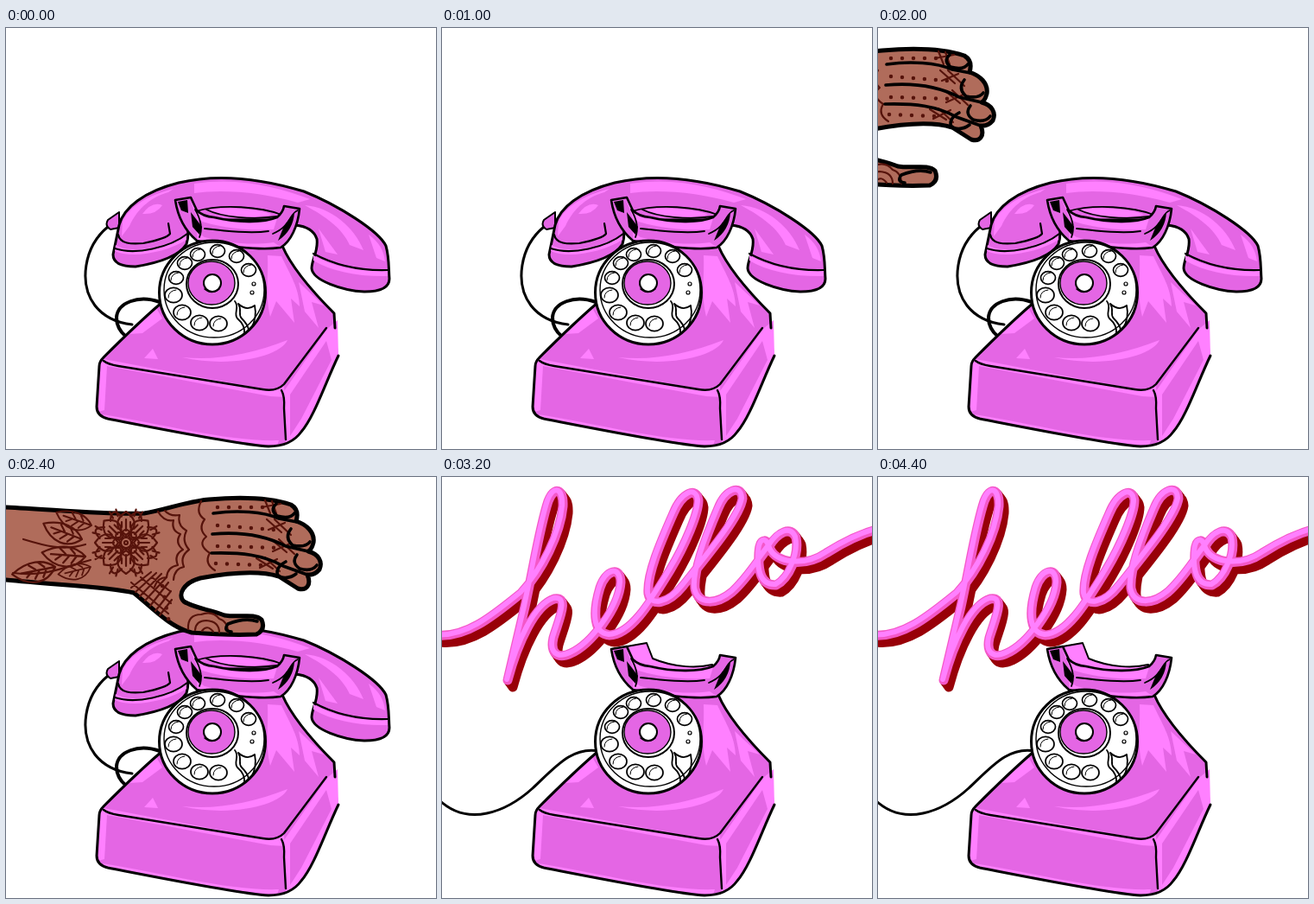
These frames come from a looping animation (498x487 px, 4.6 s). An HTML page:

```html
<!DOCTYPE html>
<html lang="en">
<head>
<meta charset="utf-8">
<title>Hello phone</title>
<style>
html, body { margin: 0; width: 100%; height: 100%; overflow: hidden; background: #fff; }
svg { display: block; width: 100vw; height: 100vh; }
path, ellipse, circle { stroke-linecap: round; stroke-linejoin: round; }
.ink { fill: none; stroke: #000; stroke-width: 3; }
.thin { fill: none; stroke: #000; stroke-width: 1.8; }
.mid { fill: #e466e4; }
.lit { fill: #ff80ff; }
.white { fill: #fff; }
.skin { fill: #b06c5b; }
.henna { fill: none; stroke: #56130b; stroke-width: 2.2; }
.dots { stroke-width: 4.5; stroke-dasharray: 0 13; }
.tube { fill: none; }

#phone, #handset, #restCord, #liftCord, #looseCord, #hand, #hello, #sheen {
  animation: 4600ms step-end infinite;
}
#phone { transform-origin: 268px 355px; animation-name: ring; }
#handset { transform-origin: 280px 220px; animation-name: lift; }
#hand { transform-origin: 250px 110px; animation-name: reach; }
#restCord { animation-name: rest; }
#liftCord { animation-name: stretch; }
#looseCord, #hello { animation-name: after; }
#sheen { animation-name: flicker; }

@keyframes ring {
  0%, 6.52%, 13.04%, 17.39%, 21.73%, 32.6%, 39.13%, 100% { transform: none; }
  4.34%, 15.21%, 30.43% { transform: rotate(-3.1deg); }
  10.86%, 19.56%, 36.95% { transform: rotate(3.1deg); }
}
@keyframes reach {
  0% { visibility: hidden; transform: none; }
  43.47% { visibility: visible; transform: translate(-230px, 0); }
  47.82% { visibility: visible; transform: translate(-92px, 0); }
  52.17% { visibility: visible; transform: none; }
  56.52% { visibility: visible; transform: translate(-20px, 50px) rotate(17deg); }
  60.86% { visibility: visible; transform: translate(-70px, -40px) rotate(9deg); }
  65.21%, 100% { visibility: hidden; transform: none; }
}
@keyframes lift {
  0% { visibility: visible; transform: none; }
  60.86% { visibility: visible; transform: translate(-50px, -90px) rotate(-8deg); }
  65.21%, 100% { visibility: hidden; transform: none; }
}
@keyframes rest { 0% { visibility: visible; } 60.86%, 100% { visibility: hidden; } }
@keyframes stretch { 0%, 65.21%, 100% { visibility: hidden; } 60.86% { visibility: visible; } }
@keyframes after { 0% { visibility: hidden; } 65.21%, 100% { visibility: visible; } }
@keyframes flicker {
  0%, 69.56%, 78.26%, 86.95%, 95.65%, 100% { transform: none; }
  65.21%, 73.91%, 82.6%, 91.3% { transform: translate(2px, 2px); }
}
</style>
</head>
<body>
<svg viewBox="0 0 498 487" preserveAspectRatio="none">
  <defs>
    <path id="word" d="M-8 183C28 187 60 160 92 134C116 108 137 66 140 34C141 13 130 10 123 28C113 58 106 105 96 150L76 235C88 190 108 148 130 141C148 138 136 163 129 186C125 204 134 211 149 204C172 194 205 152 207 122C207 103 190 107 183 128C174 158 176 181 194 183C220 182 243 142 264 108C282 78 297 42 297 27C295 11 278 18 268 42C253 76 237 113 239 135C242 151 262 147 279 126C308 90 345 46 348 25C347 8 329 14 320 36C307 66 291 106 293 129C297 150 319 147 336 133C354 117 366 96 379 80C389 64 404 56 410 70C414 90 402 117 387 125C369 126 366 108 367 88C368 68 378 72 380 83C387 100 420 105 445 88C464 76 483 66 506 60"/>
    <path id="petal" d="M0-9C-13-17-13-27 0-36C13-27 13-17 0-9M0-14V-27M-5-18V-24M5-18V-24"/>
    <path id="leaf" d="M0 0C10-18 30-20 48-4C30 10 12 10 0 0L38-4M10-2L14-10M18-3L23-11M26-3L32-9M12 1L18 6M22-1L29 4"/>
    <path id="grip" d="M124 262L131 228C136 208 160 189 200 179C250 167 302 176 345 189C385 205 432 235 440 252C444 266 443 278 444 290C444 300 434 305 415 305C390 304 355 292 354 278C354 268 362 258 360 244C356 232 345 229 335 228L318 222L222 222L205 215C212 228 212 240 209 250C200 264 175 272 150 276C135 276 124 272 124 262Z"/>
  </defs>

  <g id="phone">
    <g class="ink">
      <g id="restCord">
        <path d="M118 230C90 253 84 296 103 321C114 335 128 341 146 343"/>
        <path d="M178 317C153 308 129 318 128 335C128 345 133 352 139 357" stroke-width="4"/>
      </g>
      <g id="liftCord">
        <path d="M71 162C40 230 65 326 146 343M178 317C153 308 129 318 128 335C128 345 133 352 139 357"/>
      </g>
      <path id="looseCord" d="M182 317C150 311 130 337 105 360C75 387 30 406-4 373"/>
    </g>

    <path class="lit" d="M214 196L237 192L244 210C270 221 297 221 313 217L314 228L224 226Z" stroke="#000" stroke-width="2"/>

    <g id="handset">
      <path class="mid" d="M131 213L118 222Q114 229 121 233L131 231Z" stroke="#000" stroke-width="2"/>
      <use href="#grip" class="mid" stroke="#000" stroke-width="3"/>
      <g class="lit">
        <path d="M127 251C145 262 185 254 209 239L209 245C185 260 145 267 126 258Z"/>
        <path d="M356 263C380 277 410 282 442 281L442 287C410 288 378 282 356 269Z"/>
        <path d="M135 224C142 207 165 193 194 186L188 190C170 195 153 207 143 229L134 241Z"/>
        <path d="M158 215Q169 200 181 205Q174 216 158 215Z"/>
        <path d="M218 180C270 172 315 184 352 198L338 202C298 190 250 186 218 191Z"/>
        <path d="M346 205C376 207 404 231 414 257L398 251C389 231 370 218 346 205Z"/>
        <path d="M420 239Q437 251 439 270L429 266Z"/>
        <path d="M362 232L384 262L370 259Z"/>
        <path d="M232 211C256 206 292 209 308 216C280 221 250 218 232 211Z"/>
      </g>
      <path class="thin" d="M220 212C250 203 296 207 319 216M232 210C250 219 285 222 314 218"/>
      <path class="ink" style="stroke-width:2.2" d="M130 239C132 250 145 250 159 249C174 246 187 242 190 238L188 226M126 255C150 263 190 254 210 238M356 261C380 274 410 281 442 280"/>
    </g>

    <path class="mid" d="M113 381C130 364 160 335 180 318L222 252L320 252C332 280 358 308 380 330L385 379C370 410 357 450 342 467Q330 484 304 484C270 482 180 464 118 452Q105 449 105 438L108 391Q108 386 113 381Z"/>
    <g class="lit">
      <path d="M372 348L384 338L385 379C370 410 357 450 342 467Q334 479 324 479L322 420Z"/>
      <path d="M113 383L300 418Q315 420 322 414L323 427L306 426L117 391L114 442L107 444L108 391Z"/>
      <path d="M112 447C185 459 260 479 316 477L314 483C260 480 180 464 118 452Z"/>
      <path d="M160 382L170 371L176 383Z"/>
      <path d="M204 381C246 385 284 377 326 361C318 379 263 394 204 381Z"/>
      <path d="M303 263L319 264C329 286 339 299 340 322L330 313L334 341L313 316L306 334C300 309 304 290 303 263Z"/>
      <path d="M339 294L368 321L354 317L362 347L346 328Z"/>
      <path d="M143 354L174 324L181 336L158 353Z"/>
    </g>
    <path class="mid" d="M329 424L371 362L377 384L342 452L329 472Z"/>
    <path class="ink" d="M180 318C160 335 130 364 113 381Q108 386 108 391L105 438Q105 449 118 452C180 464 270 482 304 484Q330 484 342 467C357 450 370 410 385 379M381 347L380 330C358 308 332 280 320 252"/>
    <path class="ink" style="stroke-width:2.4" d="M113 385Q118 389 130 391L297 418Q313 421 322 412L371 347M319 419Q323 426 322 440L324 476"/>

    <path class="mid" d="M196 199L214 196L221 211Q228 218 241 219C270 226 299 225 314 219Q321 213 322 206L340 209C338 229 330 247 318 254C290 258 250 251 221 246C208 235 199 219 196 199Z"/>
    <g class="lit">
      <path d="M213 198L221 212Q228 220 241 221C270 228 299 227 314 220L310 233C275 235 244 230 222 222Z"/>
      <path d="M221 236L230 242C258 250 288 251 310 248L316 252C288 256 250 250 222 245Z"/>
    </g>
    <path d="M199 201L210 199L211 214L203 211ZM214 213L227 230L224 239L216 230ZM334 213Q333 234 315 246L322 229Z"/>
    <path class="ink" style="stroke-width:2.6" d="M196 199L214 196L221 211Q228 218 241 219C270 226 299 225 314 219Q321 213 322 206L340 209C338 229 330 247 318 254C290 258 250 251 221 246C208 235 199 219 196 199Z"/>
    <path class="thin" d="M219 210C226 222 228 232 224 242M338 211C328 214 331 229 309 238M230 232C256 235 284 238 304 235"/>

    <g class="white" stroke="#000">
      <ellipse cx="239" cy="306" rx="61.5" ry="60" stroke-width="3"/>
      <ellipse cx="241" cy="303" rx="58" ry="55" stroke-width="1.4"/>
      <g id="holes" stroke-width="1.7"></g>
      <ellipse class="white" cx="239" cy="296" rx="30" ry="28" stroke-width="2"/>
      <ellipse class="mid" cx="238" cy="295" rx="27" ry="25" stroke-width="1.4"/>
      <circle cx="239" cy="295" r="10" stroke-width="2"/>
      <path d="M230 302Q238 309 247 302" fill="none" stroke-width="1.5"/>
      <path d="M265 316C271 323 263 330 268 336C275 342 277 347 276 354M269 319C274 327 268 331 273 336C279 342 281 346 281 350M269 319Q279 328 288 321M288 321Q291 335 284 347" fill="none" stroke-width="1.8"/>
      <circle cx="287" cy="296" r="2" stroke-width="1.2"/>
      <circle cx="285" cy="306" r="2" stroke-width="1.2"/>
    </g>
  </g>

  <g id="hand">
    <path class="skin" stroke="#000" stroke-width="5" d="M-300 28L0 35C60 38 120 44 160 42C185 38 210 28 235 26C270 23 306 24 330 32Q340 38 336 51C348 55 358 64 356 76Q354 84 350 86C362 89 367 98 363 107Q357 114 349 113C354 125 348 132 338 129L316 115C290 107 252 112 225 117C206 122 198 136 206 144C219 152 236 153 253 160C271 163 287 157 296 165Q301 177 290 182C267 183 240 182 215 180C190 174 168 150 148 134C120 127 60 125 0 119L-300 110Z"/>
    <g class="henna">
      <g id="flower" transform="translate(139 76)"></g>
      <use href="#leaf" transform="translate(92 92) rotate(190) scale(1.05)"/>
      <use href="#leaf" transform="translate(88 72) rotate(207)"/>
      <use href="#leaf" transform="translate(57 104) rotate(175) scale(1.05)"/>
      <use href="#leaf" transform="translate(99 56) rotate(205) scale(.9)"/>
      <use href="#leaf" transform="translate(98 104) rotate(172) scale(.8)"/>
      <path d="M8 111C48 116 73 102 98 96M20 72C43 79 66 86 92 78"/>
      <path d="M176 40Q183 52 194 50Q191 62 202 66Q195 76 205 84Q194 90 199 102Q187 104 186 116Q176 116 172 127"/>
      <path d="M184 39Q190 46 201 44Q198 56 209 62Q203 74 212 84Q201 92 206 104Q195 106 194 119"/>
      <path d="M145 122L188 158M156 116L191 146M169 116L190 132M145 128L168 110M150 133L174 111M155 138L180 112M161 143L186 116M167 149L188 122M173 155L191 132M178 160L192 142"/>
      <path d="M226 28Q219 42 230 49Q222 60 232 69Q221 78 236 88Q229 100 242 108"/>
      <path class="dots" d="M245 35H298M245 56L310 61M245 80L315 82M243 100L296 102M181 126L189 169"/>
      <path d="M300 27L306 42M308 28L313 42M296 35L318 31M302 49L319 64M311 49L330 67M304 61L323 53M307 72L325 87M316 72L334 89M309 86L329 77M290 94L309 106M300 93L317 109M294 105L314 95"/>
      <path d="M211 176Q210 159 226 159Q239 154 247 164Q257 167 257 180M219 177Q220 166 232 166Q247 167 247 180M227 178Q233 170 240 179"/>
    </g>
    <g class="ink" style="stroke-width:3.6">
      <path d="M240 42C268 38 298 40 316 48L337 52M239 66C272 63 299 67 324 80L350 86M238 88C272 87 298 90 321 103L349 113"/>
      <path d="M313 31Q305 38 314 45Q329 49 334 42M330 60Q322 70 332 79Q347 82 352 75M337 90Q330 99 340 106Q354 110 360 102M324 98Q311 105 315 115Q327 119 336 112"/>
      <path d="M291 167Q277 162 257 170Q251 178 261 179"/>
    </g>
  </g>

  <g id="hello" class="tube">
    <g id="shade" stroke="#980008" stroke-width="11"></g>
    <use href="#word" stroke="#f458c8" stroke-width="11"/>
    <g id="sheen"><use href="#word" x="-1" y="-1" stroke="#ff80ff" stroke-width="6"/></g>
  </g>
</svg>
<script>
const ns = "http://www.w3.org/2000/svg";
function add(id, tag, attrs) {
  const el = document.createElementNS(ns, tag);
  for (const key in attrs) el.setAttribute(key, attrs[key]);
  document.getElementById(id).append(el);
}

const holes = [[281, 280], [267, 264], [245, 258], [222, 262], [207, 272],
  [197, 289], [194, 309], [204, 329], [224, 341], [246, 342]];
holes.forEach(([cx, cy], i) => {
  const size = i > 5 ? 10 : 8.5;
  add("holes", "ellipse", { cx, cy, rx: size, ry: size * .86 });
  add("holes", "path", {
    d: `M${cx - 6} ${cy + 3}Q${cx - 6} ${cy - 5} ${cx + 3} ${cy - 6}`,
    fill: "none", "stroke-width": 1
  });
});

for (let i = 0; i < 8; i++) {
  const turn = `rotate(${i * 45})`;
  add("flower", "use", { href: "#petal", transform: turn });
  add("flower", "circle", { cx: 0, cy: -11, r: 4, transform: turn });
  add("flower", "path", { d: "M-7-30Q0-46 7-30M-3-32L-4-40M3-32L4-40", transform: `rotate(${i * 45 + 22.5})` });
}
add("flower", "circle", { r: 6 });
add("flower", "circle", { r: 2 });

for (let i = 3; i > 0; i--) add("shade", "use", { href: "#word", x: i * 2, y: i * 2.7 });
</script>
</body>
</html>
```
